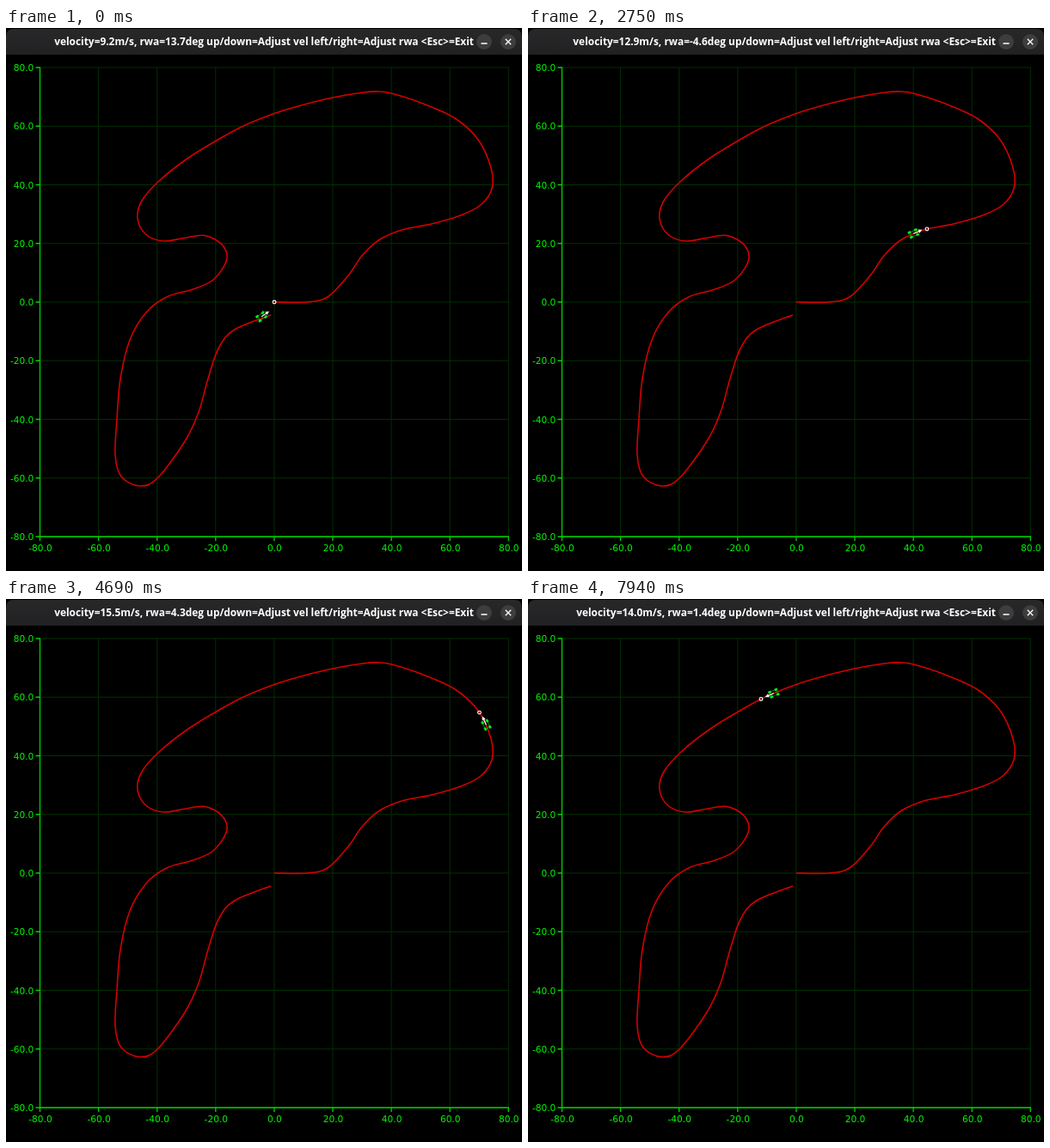
Write an HTML page that moves like this. It is 600x632 px and loops after 8000 ms.

```html
<!DOCTYPE html>
<html lang="en">
<head>
<meta charset="utf-8">
<title>Path tracking</title>
<style>
  html, body { margin: 0; width: 100%; height: 100%; overflow: hidden; background: #000; }
  svg { display: block; }
  .title { font: bold 11.9px "Open Sans", sans-serif; fill: #fff; text-anchor: end; }
  .label { font: 10.6px "DejaVu Sans", sans-serif; fill: #00f800; }
  .grid { stroke: #003000; }
  .axis { stroke: #00d400; stroke-width: 1.3; fill: none; }
  .track { stroke: #d40000; stroke-width: 1.6; fill: none; }
  .car { stroke: #00f020; fill: none; }
</style>
</head>
<body>
<svg width="600" height="632" viewBox="0 0 600 632">
  <defs>
    <linearGradient id="bar" x2="0" y2="1">
      <stop offset="0" stop-color="#292829"/><stop offset="1" stop-color="#212022"/>
    </linearGradient>
  </defs>
  <rect width="600" height="632"/>
  <path d="M0 31V10Q0 1 9 1H591Q600 1 600 10V31Z" fill="url(#bar)"/>
  <text id="title" class="title" x="544" y="20.3"></text>
  <g fill="#3e3d3e"><circle cx="556" cy="16" r="9"/><circle cx="584" cy="16" r="9"/></g>
  <path d="M552.5 18h7M580.8 12.8l6.4 6.4M587.2 12.8l-6.4 6.4" stroke="#fff" stroke-width="1.3"/>
  <g id="plot"></g>
  <path id="track" class="track"/>
  <g id="car">
    <g class="car">
      <path d="M-4 -3H4V3H-4Z" stroke-width=".9" stroke-opacity=".6"/>
      <path d="M-5.8 -3h3.6M-5.8 3h3.6" stroke-width="2.7"/>
      <path class="wheel" d="M-1.8 0h3.6" stroke-width="2.7"/>
      <path class="wheel" d="M-1.8 0h3.6" stroke-width="2.7"/>
    </g>
    <path d="M0 0H9" stroke="#fff" stroke-width="1.1"/>
    <path d="M11 0L6.5 -2.2V2.2Z" fill="#fff"/>
  </g>
  <circle id="goal" r="1.9" fill="none" stroke="#fff" stroke-width="1.1"/>
</svg>
<script>
const NS = "http://www.w3.org/2000/svg";
const LOOP = 8000, STEP = 62.5, SUBSTEPS = 8;
const WHEELBASE = 8.5, LOOKAHEAD = 16.3, PX_PER_SPEED = 0.00614;
const DEG = Math.PI / 180;
const $ = id => document.getElementById(id);

function add(name, attrs, text) {
  const node = document.createElementNS(NS, name);
  for (const key in attrs) node.setAttribute(key, attrs[key]);
  if (text) node.textContent = text;
  $("plot").append(node);
}

// Smooth curve through the points (Catmull-Rom as cubic Beziers).
function curve(pts) {
  const at = i => pts[Math.max(0, Math.min(pts.length - 1, i))];
  const shift = (p, a, b, k) => p.map((value, j) => value + (b[j] - a[j]) * k);
  return "M" + pts[0] + pts.slice(1).map((p, i) =>
    "C" + [shift(pts[i], at(i - 1), p, 1 / 6), shift(p, pts[i], at(i + 2), -1 / 6), p].join(" ")).join("");
}

const bends = "312,319 350,319 374,313 398,288 414,265 434,246.5 462,234.5 495,228 530,217.5 552,206 " +
  "565,187 564,163 549,130 522,105 485,88 450,76.5 434,74 415,75 380,81 345,89.5 312,99.5 275,114.5 " +
  "243,132 210,152.5 178,178 158,201 153,222 163,240.5 183,248 207,244.5 231,241.5 251,252 256.5,270 " +
  "241,293 216,304.5 187,313 163,331 144,363 133,408 129,455 127,497 134,522 155,533 176,524 208,481 " +
  "224,447 235,408 247,373 265,351.5 308,334";
$("track").setAttribute("d", curve(bends.split(" ").map(pair => pair.split(",").map(Number))));

const speedKeys = [[0, 9.2], [810, 10.6], [2750, 12.9], [4000, 15.5], [6560, 15.5], [LOOP, 13.94]];

function speedAt(t) {
  const i = Math.max(1, speedKeys.findIndex(key => key[0] >= t));
  const [t0, a] = speedKeys[i - 1], [t1, b] = speedKeys[i];
  return a + (b - a) * (t - t0) / (t1 - t0);
}

// The car steers straight at a goal that keeps a fixed distance ahead on the track.
function simulate() {
  const states = [], dt = STEP / SUBSTEPS;
  let x = 297, y = 336, heading = -34.9 * DEG, along = 0;
  for (let i = 0; i * dt < LOOP; i++) {
    let goal = $("track").getPointAtLength(along);
    while (Math.hypot(goal.x - x, goal.y - y) < LOOKAHEAD) {
      along += 0.25;
      goal = $("track").getPointAtLength(along);
    }
    const bearing = Math.atan2(goal.y - y, goal.x - x) - heading;
    const steer = Math.atan2(Math.sin(bearing), Math.cos(bearing));
    const speed = speedAt(i * dt), move = speed * PX_PER_SPEED * dt;
    if (i % SUBSTEPS === 0) states.push({ x, y, heading, goal, steer, speed });
    heading += move * Math.tan(steer) / WHEELBASE;
    x += move * Math.cos(heading);
    y += move * Math.sin(heading);
  }
  return states;
}

function drawPlot() {
  for (let i = 0; i <= 8; i++) {
    const x = 39.5 + 68.1 * i, y = 592 - 68.25 * i, text = (i * 20 - 80).toFixed(1);
    add("path", { class: "grid", d: `M${x} 46V592M39.5 ${y}H584.5` });
    add("path", { class: "axis", d: `M${x} 592v5M39.5 ${y}h-5` });
    add("text", { class: "label", x: x + 0.5, y: 609, "text-anchor": "middle" }, text);
    add("text", { class: "label", x: 32.3, y: y + 4, "text-anchor": "end" }, text);
  }
  add("path", { class: "axis", d: "M39.5 45.5V592H585" });
}

const states = simulate();
const wheels = document.querySelectorAll(".wheel");

function draw(time) {
  // Steps fall on the nearest 10 ms, hence the small lead.
  const { x, y, heading, goal, steer, speed } = states[Math.floor((time % LOOP + 2.6) / STEP) % states.length];
  $("car").setAttribute("transform", `translate(${x} ${y}) rotate(${heading / DEG})`);
  wheels.forEach((wheel, i) =>
    wheel.setAttribute("transform", `translate(4 ${i ? 3 : -3}) rotate(${steer / DEG})`));
  $("goal").setAttribute("cx", goal.x);
  $("goal").setAttribute("cy", goal.y);
  $("title").textContent = `velocity=${speed.toFixed(1)}m/s, rwa=${(-steer / DEG).toFixed(1)}deg ` +
    "up/down=Adjust vel left/right=Adjust rwa <Esc>=Exit";
}

drawPlot();
draw(0);
let start;
requestAnimationFrame(function tick(now) {
  start ??= now;
  draw(now - start);
  requestAnimationFrame(tick);
});
</script>
</body>
</html>
```
